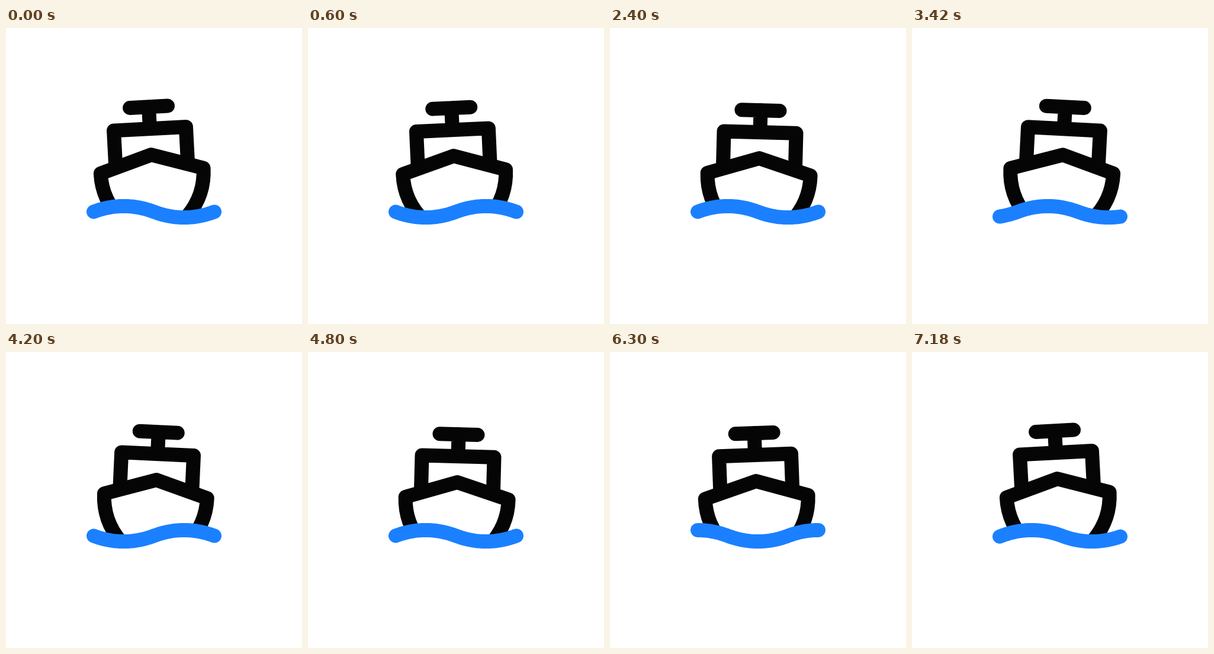
An HTML page for the animation above (7.2 s loop, 500 by 500 pixels).

```html
<!DOCTYPE html>
<html lang="en">
<head>
<meta charset="utf-8">
<title>Ship on a wave</title>
<style>
  html, body { margin: 0; height: 100%; overflow: hidden; background: #fff; }
  svg { display: block; width: 100%; height: 100%; }
  .line { fill: none; stroke-width: 24; stroke-linecap: round; stroke-linejoin: round; }
</style>
</head>
<body>
<svg viewBox="0 0 500 500">
  <g id="ship" class="line" stroke="#050505">
    <path d="M218 141H282M250 141V178M189 238V178H311V238"/>
    <path d="M208 344L194 328C171 303 163 275 163 249L250 222L337 249C337 275 329 303 306 328L292 344"/>
  </g>
  <path id="water" fill="#fff"/>
  <path id="wave" class="line" stroke="#1b80ff"/>
</svg>
<script>
const LOOP = 7200, WAVE_PERIOD = 1200;
const LEFT = 148, LENGTH = 204, LEVEL = 310.5, HEIGHT = 9.6;
const [ship, water, wave] = ["ship", "water", "wave"].map(id => document.getElementById(id));

// Alternating parabolic arcs: a crest, then a trough
function swell(phase) {
  const half = phase * 2 % 2, u = half % 1;
  return (half < 1 ? 4 : -4) * u * (1 - u);
}

function wavePath(t) {
  const points = [];
  for (let x = 0; x <= LENGTH; x += 2) {
    const y = LEVEL - HEIGHT * swell(x / LENGTH + t / WAVE_PERIOD);
    points.push(`${LEFT + x} ${y.toFixed(2)}`);
  }
  return "M" + points.join("L");
}

function draw(t) {
  const sway = Math.cos(2 * Math.PI * t / LOOP);
  ship.setAttribute("transform", `translate(0 ${-8 * sway * sway}) rotate(${-3 * sway} 250 312)`);
  const d = wavePath(t);
  wave.setAttribute("d", d);
  // Hides the hull below the water line
  water.setAttribute("d", d + "V400H" + LEFT + "Z");
}

const start = performance.now();
function tick() {
  draw((performance.now() - start) % LOOP);
  requestAnimationFrame(tick);
}
tick();
</script>
</body>
</html>
```
